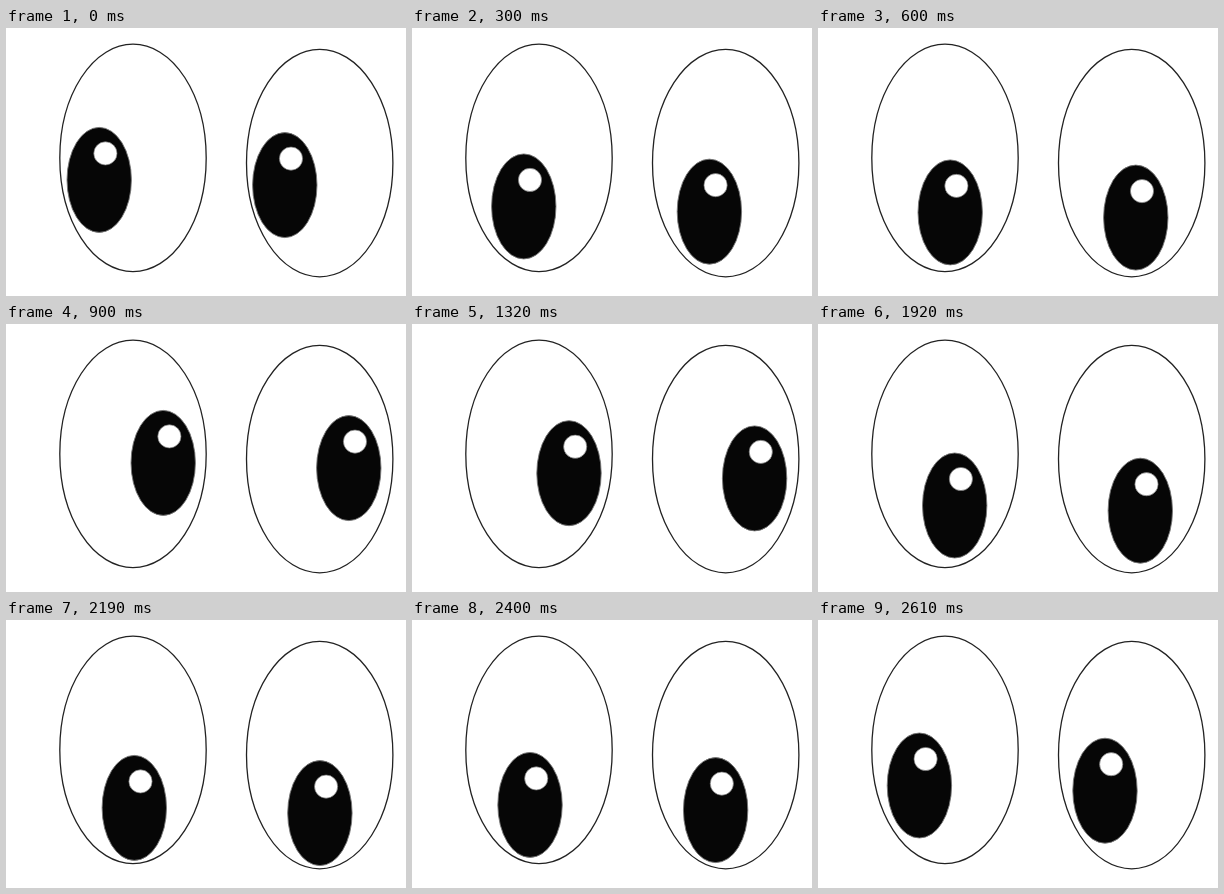
Recreate the animation shown at these times as an HTML page with a canvas. Size 400x268 px, loop 2700 ms.

```html
<!DOCTYPE html>
<html lang="en">
<head>
<meta charset="utf-8">
<title>Looking eyes</title>
<style>
  html, body { margin: 0; width: 100%; height: 100%; overflow: hidden; background: #fff; }
  canvas { display: block; }
</style>
</head>
<body>
<canvas id="stage" width="400" height="268"></canvas>
<script>
const ctx = document.getElementById('stage').getContext('2d');
const LOOP = 2700, STEP = 30, LAST_STEP = 87;
const LEFT_EYE = { x: 127, y: 129.9 }, RIGHT_EYE = { x: 313.7, y: 135.1 };
const RIGHT_GAZE = { x: 185.6, y: 5.2 };

// Where the left pupil looks at a few steps; a smooth curve joins them.
const gaze = [
  { step: 0, x: 93.2, y: 151.9 },
  { step: 20, x: 132.2, y: 184.4 },
  { step: 30, x: 157.2, y: 138.9 },
  { step: 36, x: 163.3, y: 127 },
  { step: 44, x: 157, y: 149.2 },
  { step: 64, x: 136.7, y: 181.5 },
  { step: 73, x: 128.3, y: 187.9 },
  { step: 77, x: 123.6, y: 189.2 },
  { step: LAST_STEP, x: 101.4, y: 165.5 }
];

const slope = (i, axis) =>
  (gaze[i + 1][axis] - gaze[i][axis]) / (gaze[i + 1].step - gaze[i].step);

// Velocity at a key: the two neighbouring slopes, the nearer key weighing more.
function velocity(i, axis) {
  if (i === 0) return slope(0, axis);
  if (i === gaze.length - 1) return slope(i - 1, axis);
  const before = gaze[i].step - gaze[i - 1].step;
  const after = gaze[i + 1].step - gaze[i].step;
  return (slope(i - 1, axis) * after + slope(i, axis) * before) / (before + after);
}

function coordinate(i, axis, u) {
  const span = gaze[i + 1].step - gaze[i].step;
  const d = gaze[i + 1][axis] - gaze[i][axis];
  const m = velocity(i, axis) * span, n = velocity(i + 1, axis) * span;
  return gaze[i][axis] + u * (m + u * (3 * d - 2 * m - n + u * (m + n - 2 * d)));
}

function pupilAt(step) {
  let i = 0;
  while (i < gaze.length - 2 && step >= gaze[i + 1].step) i++;
  const u = (step - gaze[i].step) / (gaze[i + 1].step - gaze[i].step);
  return { x: coordinate(i, 'x', u), y: coordinate(i, 'y', u) };
}

function ellipse(x, y, rx, ry, fill, stroke, width) {
  ctx.beginPath();
  ctx.ellipse(x, y, rx, ry, 0, 0, Math.PI * 2);
  ctx.fillStyle = fill;
  ctx.fill();
  ctx.strokeStyle = stroke;
  ctx.lineWidth = width;
  ctx.stroke();
}

function drawEye(eye, x, y) {
  ellipse(eye.x, eye.y, 73.2, 113.7, '#fff', '#222', 1.3);
  ellipse(x, y, 32.2, 52.5, '#060606', '#777', 0.9);
  ellipse(x + 6.2, y - 26.5, 11.6, 11.6, '#fff', '#777', 0.7);
}

function draw(elapsed) {
  const step = Math.min(Math.floor((elapsed % LOOP) / STEP), LAST_STEP);
  const { x, y } = pupilAt(step);
  ctx.fillStyle = '#fff';
  ctx.fillRect(0, 0, 400, 268);
  drawEye(LEFT_EYE, x, y);
  drawEye(RIGHT_EYE, x + RIGHT_GAZE.x, y + RIGHT_GAZE.y);
}

let start;
function tick(now) {
  start ??= now;
  draw(now - start);
  requestAnimationFrame(tick);
}
draw(0);
requestAnimationFrame(tick);
</script>
</body>
</html>
```
